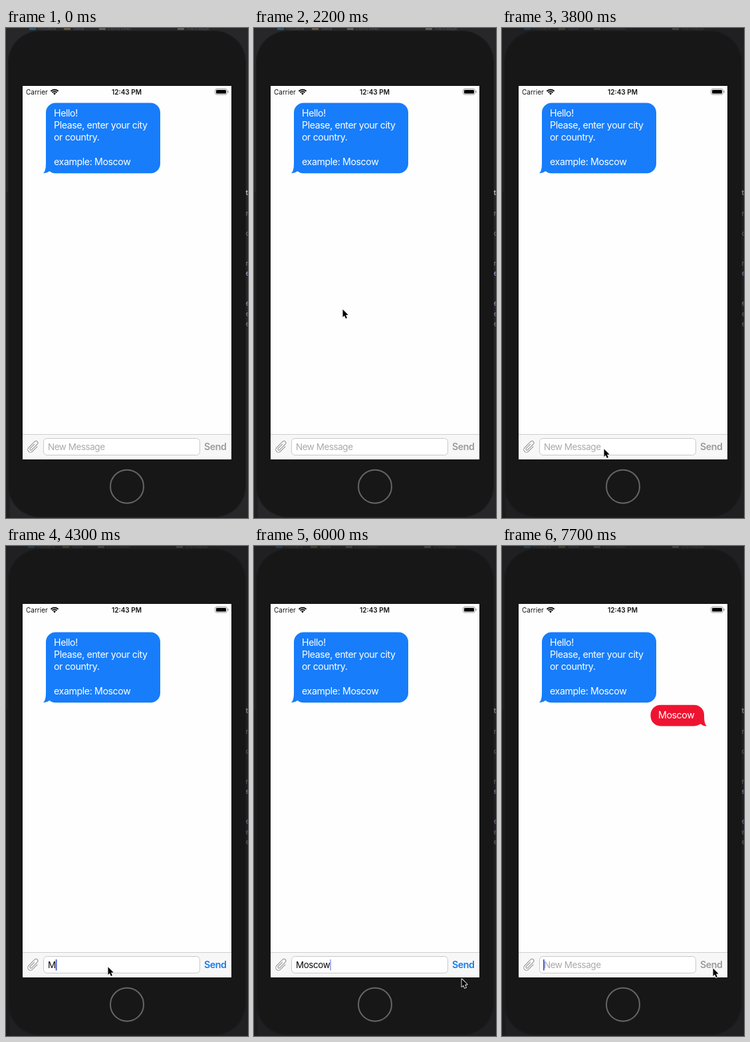
Recreate the animation shown at these times as an HTML page with a canvas. Size 364 px wide and 736 px high, loop 8 s.

```html
<!DOCTYPE html>
<html lang="en">
<head>
<meta charset="utf-8">
<title>Chat</title>
<style>
html, body { margin: 0; height: 100%; overflow: hidden; background: #18181a; }
canvas { display: block; width: 364px; height: 736px; }
</style>
</head>
<body>
<canvas></canvas>
<script>
const W = 364, H = 736, LOOP = 8000;
const canvas = document.querySelector('canvas');
const ctx = canvas.getContext('2d');
const scale = Math.max(1, window.devicePixelRatio || 1);
canvas.width = W * scale;
canvas.height = H * scale;

const FOCUS = 3900, SENT = 6400;
const BLUE = '#177dfb', RED = '#ee1431';
const KEYS = [4200, 4500, 4700, 4850, 5000, 5150];
const WORD = 'Moscow';
// time, x, y of the pointer tip
const POINTER = [
  [1050, -14, 148], [1200, -5, 152], [1700, 3, 162], [1950, 52, 270],
  [2200, 133, 422], [2500, 146, 510], [2900, 152, 605], [3200, 153, 632],
  [5450, 153, 632], [5750, 262, 668], [6000, 312, 650], [6250, 317, 634], [LOOP, 317, 634]
];

const clamp = v => Math.min(1, Math.max(0, v));
const ease = v => { v = clamp(v); return v * v * (3 - 2 * v); };

function box(x, y, w, h, r, fill, stroke) {
  ctx.beginPath();
  ctx.roundRect(x, y, w, h, r);
  if (fill) { ctx.fillStyle = fill; ctx.fill(); }
  if (stroke) { ctx.strokeStyle = stroke; ctx.lineWidth = 1; ctx.stroke(); }
}

function text(str, x, y, color, size = 14.2, weight = 400, spacing = '-0.4px') {
  ctx.font = `${weight} ${size}px Inter, Roboto, sans-serif`;
  ctx.letterSpacing = spacing;
  ctx.fillStyle = color;
  ctx.fillText(str, x, y);
}

function drawDesktop(t) {
  const dim = t >= 2600;
  ctx.fillStyle = dim ? '#202022' : '#272729';
  ctx.fillRect(0, 0, W, H);
  ctx.fillStyle = dim ? '#1c1c1e' : '#202022';
  ctx.fillRect(0, 246, 6, H - 246);
  ctx.save();
  ctx.globalAlpha = dim ? 0.4 : 0.75;
  const shift = dim ? -2 : 0;
  [[35, '#286386'], [87, '#75683f'], [140, '#6b6b6d'], [258, '#6b6b6d']].forEach(([x, c]) => {
    ctx.fillStyle = c;
    ctx.fillRect(x + shift, 0, 10, 3);
  });
  ['models', 'data', 'controller', 'message'].forEach((s, i) =>
    text(s, [48, 101, 153, 272][i] + shift, 3, '#626266', 8, 400, '0px'));
  ctx.restore();

  box(3, 4, 358, 731, 48, '#171718');
  box(3.5, 4.5, 357, 730, 48, null, '#1d1d1f');

  ctx.save();
  ctx.globalAlpha = dim ? 0.6 : 0.9;
  [[251, 't', '#d0d0d5'], [282, 'r', '#77777c'], [312, 'c', '#77777c'], [357, 'r', '#77777c'],
   [372, 'e', '#a098c8'], [417, 'e', '#b07ab5'], [433, 'e', '#77777c'], [448, 'e', '#77777c']]
    .forEach(([y, s, c]) => text(s, 360.5, y, c, 10, 600, '0px'));
  ctx.restore();
}

function drawHomeButton() {
  ctx.beginPath();
  ctx.arc(182, 688.7, 25, 0, 2 * Math.PI);
  ctx.strokeStyle = '#666668';
  ctx.lineWidth = 2;
  ctx.stroke();
}

function drawStatusBar() {
  text('Carrier', 30, 99.6, '#111', 10, 400, '0px');
  text('12:43 PM', 159, 99.6, '#111', 10, 600, '0px');
  ctx.strokeStyle = '#000';
  ctx.lineWidth = 1.9;
  [7.6, 4.8].forEach(r => {
    ctx.beginPath();
    ctx.arc(73, 100.2, r, -Math.PI * 0.76, -Math.PI * 0.24);
    ctx.stroke();
  });
  ctx.beginPath();
  ctx.moveTo(73, 100.4);
  ctx.arc(73, 100.2, 2.7, -Math.PI * 0.76, -Math.PI * 0.24);
  ctx.fillStyle = '#000';
  ctx.fill();
  box(314.5, 91.5, 18, 8.5, 2.5, null, '#999');
  box(316, 93, 15, 5.5, 1.3, '#000');
  box(333.5, 94, 1.3, 3.5, 0.7, '#999');
}

function bubble(x, y, w, h, r, color, side) {
  box(x, y, w, h, r, color);
  const edge = side < 0 ? x : x + w, bottom = y + h;
  ctx.beginPath();
  ctx.moveTo(edge, bottom - 15);
  ctx.quadraticCurveTo(edge, bottom - 3, edge + side * 4, bottom);
  ctx.quadraticCurveTo(edge - side, bottom + 0.3, edge - side * 6, bottom - 3.5);
  ctx.lineTo(edge - side * 12, bottom - 8);
  ctx.fill();
}

function drawMessages(t) {
  const y = 112.5 + 17 * ease((t - FOCUS) / 250);
  bubble(60, y, 172, 105.7, 14.5, BLUE, -1);
  ['Hello!', 'Please, enter your city', 'or country.', '', 'example: Moscow']
    .forEach((line, i) => text(line, 72, y + 20 + i * 18.45, '#fff'));
  if (t >= SENT) {
    ctx.save();
    ctx.globalAlpha = clamp((t - SENT + 100) / 200);
    bubble(223.5, 238.7, 80.5, 31.7, 15, RED, 1);
    text(WORD, 235, 258.8, '#fff');
    ctx.restore();
  }
}

function drawClip() {
  ctx.save();
  ctx.translate(41, 629);
  ctx.rotate(Math.PI / 4);
  ctx.beginPath();
  ctx.moveTo(4, -5);
  ctx.lineTo(4, 6);
  ctx.arc(0, 6, 4, 0, Math.PI);
  ctx.lineTo(-4, -7);
  ctx.arc(-1.2, -7, 2.8, Math.PI, 0);
  ctx.lineTo(1.6, 5);
  ctx.arc(0, 5, 1.6, 0, Math.PI);
  ctx.lineTo(-1.6, -4);
  ctx.strokeStyle = '#929295';
  ctx.lineWidth = 1;
  ctx.stroke();
  ctx.restore();
}

function caretAlpha(t) {
  const last = [FOCUS, ...KEYS, SENT].filter(k => k <= t).pop();
  const phase = (t - last) % 1000;
  return phase < 750 ? 1 - clamp((phase - 500) / 150) : clamp((phase - 800) / 100);
}

function drawInputBar(t) {
  ctx.fillStyle = '#f7f7f7';
  ctx.fillRect(25, 610, 314, 38);
  ctx.fillStyle = '#cfcfcf';
  ctx.fillRect(25, 610, 314, 1);
  box(56.5, 616.5, 235, 25, 5, '#fff', '#c9c9cc');
  drawClip();

  const typed = t < SENT ? WORD.slice(0, KEYS.filter(k => k <= t).length) : '';
  text(typed || 'New Message', 63, 634.2, typed ? '#080808' : '#a9a9ad', 13.4);
  const width = typed ? ctx.measureText(typed).width : -1;
  text('Send', 298, 634.3, typed ? '#177be8' : '#9b9b9f', 14.2, 600);
  if (t >= FOCUS) {
    ctx.save();
    ctx.globalAlpha = caretAlpha(t);
    ctx.fillStyle = '#4356c8';
    ctx.fillRect(63 + width, 621, 1.8, 16.5);
    ctx.restore();
  }
}

function drawPointer(t) {
  const i = POINTER.findIndex(p => p[0] > t);
  if (i < 1) return;
  const [t0, x0, y0] = POINTER[i - 1], [t1, x1, y1] = POINTER[i];
  const k = (t - t0) / (t1 - t0);
  ctx.save();
  ctx.translate(x0 + (x1 - x0) * k, y0 + (y1 - y0) * k);
  ctx.beginPath();
  [[0.5, 0.5], [0.5, 12], [3, 9.6], [4.9, 14], [6.9, 13.1], [5, 8.8], [8.6, 8.6]]
    .forEach(([x, y]) => ctx.lineTo(x, y));
  ctx.closePath();
  ctx.lineJoin = 'round';
  ctx.lineWidth = 1.8;
  ctx.strokeStyle = '#f4f4f4';
  ctx.stroke();
  ctx.fillStyle = '#000';
  ctx.fill();
  ctx.restore();
}

function draw(t) {
  ctx.setTransform(scale, 0, 0, scale, 0, 0);
  drawDesktop(t);
  drawHomeButton();
  ctx.fillStyle = '#fefefe';
  ctx.fillRect(25, 87, 314, 561);
  drawStatusBar();
  drawMessages(t);
  drawInputBar(t);
  drawPointer(t);
}

const start = performance.now();
function tick() {
  draw((performance.now() - start) % LOOP);
  requestAnimationFrame(tick);
}
tick();
</script>
</body>
</html>
```
